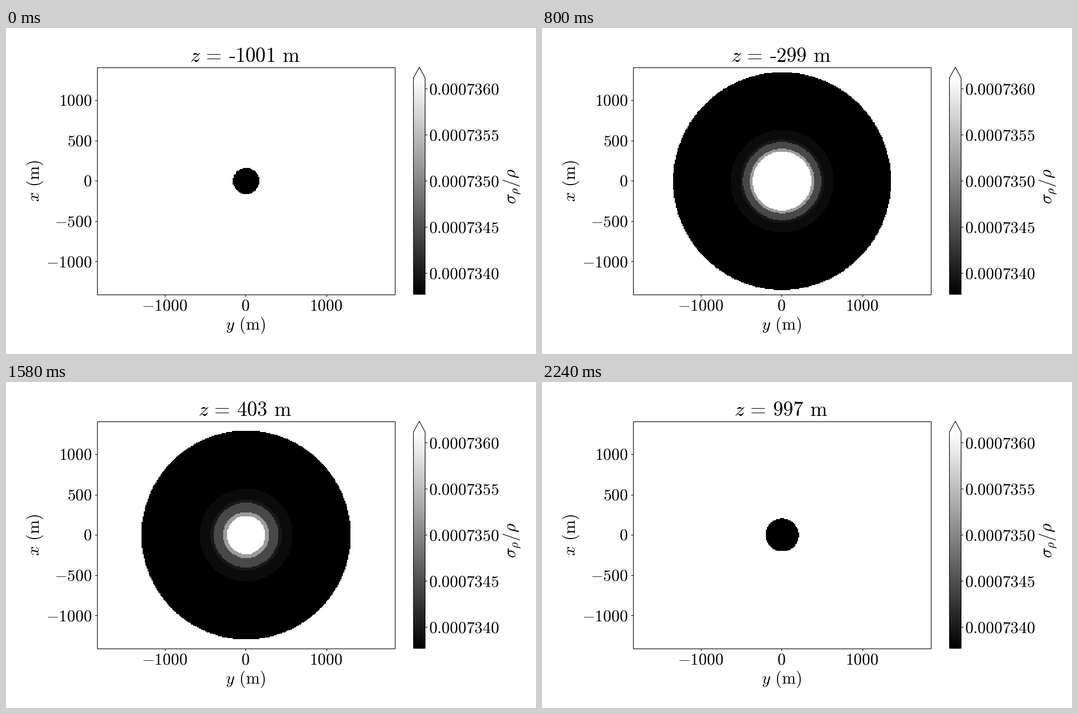
A matplotlib script that plays this animation: 954x587 px, repeating every 2260 ms.

```python
import numpy as np
import matplotlib.pyplot as plt
from matplotlib.animation import FuncAnimation
from matplotlib.patches import Polygon, Rectangle

W, H, DPI = 954, 587, 100
LEFT, RIGHT, TOP, BOTTOM = 164, 700, 70.6, 479.6
X0, Y0, SCALE = 431.4, 275.2, 0.1452   # pixel of the origin, pixels per metre
CELL, Z_STEP, STEPS, TICKS = 12, 18, 112, 113
LABEL, TITLE = 21.2, 26.4              # font sizes in points
TITLE_EM = TITLE * DPI / 72
TITLE_BASE = 61

# Nested ellipsoids: equatorial radius, polar radius, grey level
SHELLS = [
    (1412.5, 1007.65, 0),
    (702, 702, 11),
    (597, 597, 24),
    (568, 570, 72),
    (504.6, 489, 155),
    (477, 464.3, 255),
]

plt.rcParams["mathtext.fontset"] = "cm"
plt.rcParams["font.family"] = "DejaVu Serif"

fig = plt.figure(figsize=((W + 0.01) / DPI, (H + 0.01) / DPI), dpi=DPI,
                 facecolor="white")
ax = fig.add_axes([0, 0, 1, 1])
ax.axis("off")


def px(v):
    return X0 + v * SCALE


def py(v):
    return Y0 - v * SCALE


def line(xs, ys, width=0.8):
    return ax.plot(xs, ys, color="black", lw=width, solid_capstyle="butt",
                   zorder=5)[0]


def label(x, y, text, size=LABEL, ha="center", rotation=0):
    return ax.text(x, y, text, fontsize=size, ha=ha, va="baseline",
                   rotation=rotation, rotation_mode="anchor")


def outline(points):
    ax.add_patch(Polygon(points, fill=False, ec="black", lw=0.8,
                         joinstyle="miter", zorder=6))


# Slice through the body
centres = CELL * np.arange(-117, 118) - 1
lo, hi = centres[0] - CELL / 2, centres[-1] + CELL / 2
gx, gy = np.meshgrid(centres, centres[::-1])
dist2 = gx**2 + gy**2


def slice_at(z):
    grey = np.full(dist2.shape, 255, dtype=np.uint8)
    for a, c, level in SHELLS:
        grey[dist2 <= a**2 * (1 - (z / c) ** 2)] = level
    return grey


body = ax.imshow(slice_at(-1001), cmap="gray", vmin=0, vmax=255,
                 interpolation="nearest", aspect="auto",
                 extent=(px(lo), px(hi), py(lo), py(hi)))

# Colour bar
CL, CR, CT = 733.4, 754.4, 90
ax.imshow(np.linspace(1, 0, 256)[:, None], cmap="gray", vmin=0, vmax=1,
          interpolation="nearest", aspect="auto",
          extent=(CL, CR, BOTTOM, CT))
outline([(CL, BOTTOM), (CL, CT), ((CL + CR) / 2, TOP), (CR, CT), (CR, BOTTOM)])
for k in range(5):
    y = 441.5 - 83 * k
    line([CR, CR + 4], [y, y])
    label(760.5, y + 9.7, f"${0.000734 + 5e-7 * k:.7f}$", ha="left")

# Axes frame, ticks and labels
outline([(LEFT, TOP), (RIGHT, TOP), (RIGHT, BOTTOM), (LEFT, BOTTOM)])
for v in (-1000, 0, 1000):
    line([px(v)] * 2, [BOTTOM, BOTTOM + 4])
    label(px(v) - 1, 508, f"${v}$")
for v in range(-1000, 1001, 500):
    line([LEFT - 4, LEFT], [py(v)] * 2)
    label(154.5, py(v) + 9.7, f"${v}$", ha="right")
label(431, 543, r"$y\hspace{0.38}\mathrm{(m)}$", 21.6)
label(60, 275.5, r"$x\hspace{0.38}\mathrm{(m)}$", 22, rotation=90)
label(917, 284.7, r"$\sigma_{\rho}/\rho$", 22.3, rotation=90)

ax.set_xlim(0, W)
ax.set_ylim(H, 0)
body.set_clip_path(Rectangle((LEFT, TOP), RIGHT - LEFT, BOTTOM - TOP,
                             transform=ax.transData))

title = label(430.5, TITLE_BASE, "", TITLE)
hyphen = line([0, 0], [TITLE_BASE - 0.216 * TITLE_EM] * 2, 1.5)


def update(i):
    z = -1001 + Z_STEP * min(max(i - 1, 0), STEPS - 1)
    body.set_data(slice_at(z))
    digits = str(abs(z))
    gap = r"\hspace{0.38}" if z < 0 else ""
    title.set_text(rf"$z\,=\,{gap}\mathrm{{{digits}}}"
                   r"\hspace{0.38}\mathrm{m}$")
    hyphen.set_visible(z < 0)
    if z < 0:
        # The hyphen fills the gap left of the digits
        right = title.get_window_extent().x1
        start = right - (1.5 + 0.5 * len(digits)) * TITLE_EM
        hyphen.set_xdata([start + 0.011 * TITLE_EM, start + 0.276 * TITLE_EM])
    return body, title, hyphen


anim = FuncAnimation(fig, update, frames=TICKS, interval=20, repeat=True,
                     repeat_delay=0, blit=False)
plt.show()
```
